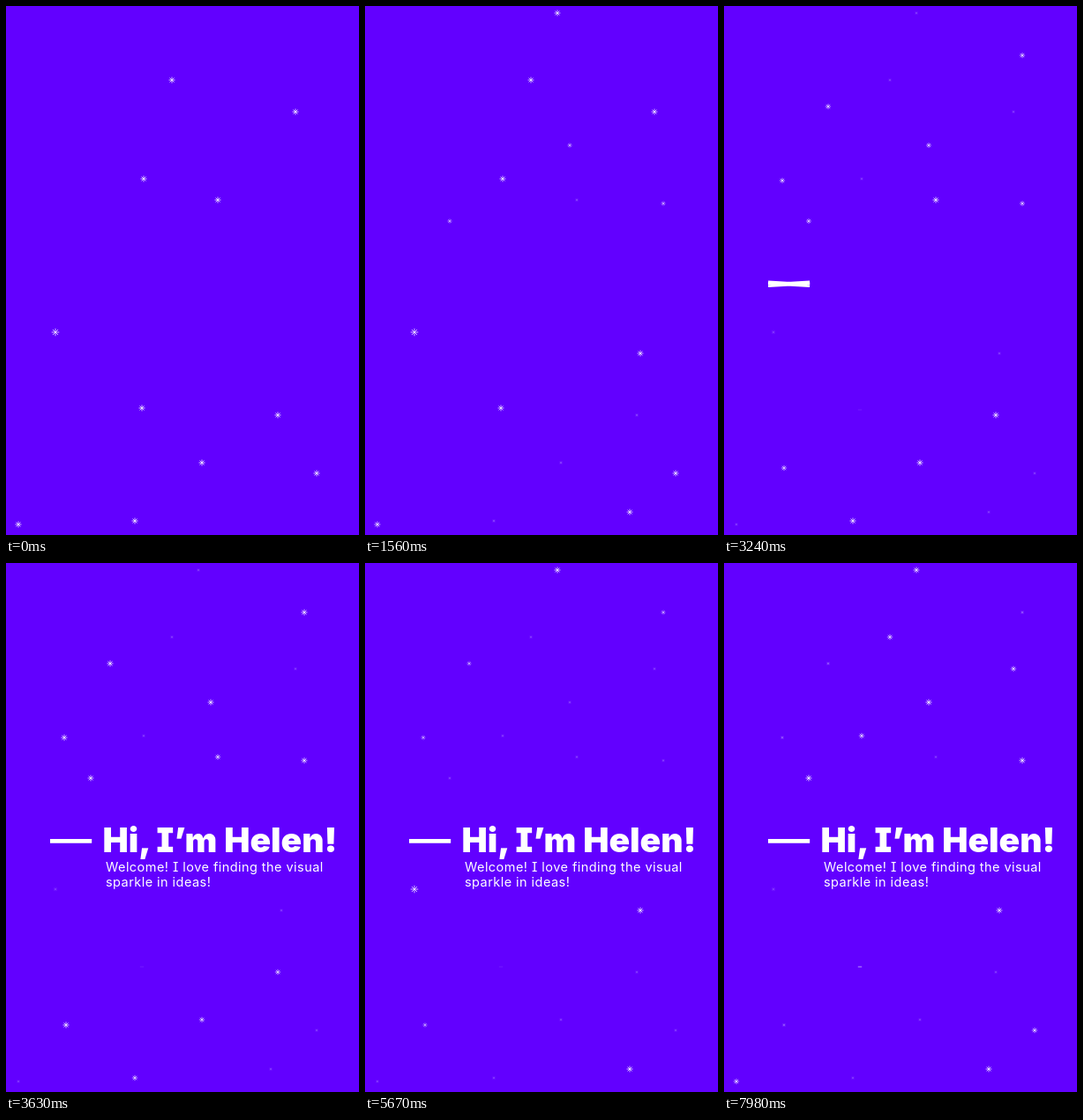
Animation, 400 px wide and 600 px high, one loop 8 s. Source, as an HTML page with a canvas:

```html
<!DOCTYPE html>
<html lang="en">
<head>
<meta charset="utf-8">
<title>Twinkling greeting</title>
<style>
  html, body { margin: 0; width: 100%; height: 100%; overflow: hidden; background: #6200ff; }
  canvas, svg { position: absolute; left: 0; top: 0; width: 400px; height: 600px; }
  text { fill: #fff; font-family: Inter, "Open Sans", sans-serif; font-feature-settings: "cv08"; }
  .title { font-size: 39px; font-weight: 900; }
  .body { font-size: 14.5px; letter-spacing: .45px; }
</style>
</head>
<body>
<canvas width="400" height="600"></canvas>
<svg viewBox="0 0 400 600">
  <g id="greeting" opacity="0">
    <text class="title" x="109.5" y="327.5">Hi, I’m Helen!</text>
    <text class="body" x="113" y="350">Welcome! I love finding the visual</text>
    <text class="body" x="113" y="367">sparkle in ideas!</text>
  </g>
</svg>
<script>
const LOOP = 8000;
const PULSE = 1700; // time from a twinkle's peak to its end
const ctx = document.querySelector('canvas').getContext('2d');
const greeting = document.getElementById('greeting');

// Stars twinkle together in groups: moments of full glow and, for late ones, when they appear
const groups = [
  { peaks: [0, 1300, 8500], at: [[188, 84], [328, 120], [156, 196], [352, 530], [14, 588]] },
  { peaks: [0, 1300, 8500], at: [[154, 456]], dashFrom: 3200 },
  { peaks: [0, 3100], at: [[240, 220], [308, 464], [222, 518], [146, 584]] },
  { peaks: [0, 1500, 5600], at: [[56, 370]], r: 4.3 },
  { peaks: [3800, 6600], born: 1500, at: [[338, 56], [118, 114], [66, 198], [68, 524]] },
  { peaks: [700, 3900, 8000], born: 700, at: [[232, 158], [338, 224], [96, 244]] },
  { peaks: [1500, 5500, 7700], born: 700, at: [[218, 8], [312, 394], [300, 574]] }
];

const clamp = x => Math.min(1, Math.max(0, x));
const ease = x => x * x * (3 - 2 * x);
const ramp = (t, from, to) => ease(clamp((t - from) / (to - from)));
const pulse = (t, peak) => 1 - ramp(Math.abs(t - peak), 0, PULSE);

function glowAt(t, peaks, born) {
  const bump = Math.max(...peaks.map(p => pulse(t, p)));
  return (.14 + .8 * bump) * ramp(t, born, born + 1000);
}

function spokes(x, y, r, angles) {
  ctx.beginPath();
  for (const a of angles) {
    const dx = r * Math.cos(a), dy = r * Math.sin(a);
    ctx.moveTo(x - dx, y - dy);
    ctx.lineTo(x + dx, y + dy);
  }
  ctx.stroke();
}

const eighths = [0, 1, 2, 3].map(n => n * Math.PI / 4);

function drawStars(t) {
  ctx.lineWidth = .75;
  for (const { peaks, at, born = -1000, r = 3.5, dashFrom = LOOP } of groups) {
    const glow = glowAt(t, peaks, born);
    ctx.globalAlpha = glow;
    for (const [x, y] of at) {
      if (t >= dashFrom) spokes(x, y + 2, 2.2, [0]);
      else spokes(x, y, r * Math.min(1, .45 + .6 * glow), eighths);
    }
  }
  ctx.globalAlpha = 1;
}

// The large sparkle opens, then its diagonals fold into a dash
function drawSparkle(t) {
  const grow = ramp(t, 2100, 2500);
  if (!grow) return;
  const tilt = Math.PI / 4 * (1 - ramp(t, 2950, 3300));
  ctx.lineWidth = 4.8;
  spokes(73.6, 315.3, 23.6 * grow, [0, tilt, -tilt]);
}

function frame(t) {
  ctx.fillStyle = '#6200ff';
  ctx.fillRect(0, 0, 400, 600);
  ctx.strokeStyle = '#fff';
  drawStars(t);
  drawSparkle(t);
  greeting.setAttribute('opacity', ramp(t, 3300, 3600));
}

const start = performance.now();
function tick() {
  frame((performance.now() - start) % LOOP);
  requestAnimationFrame(tick);
}
tick();
</script>
</body>
</html>
```
